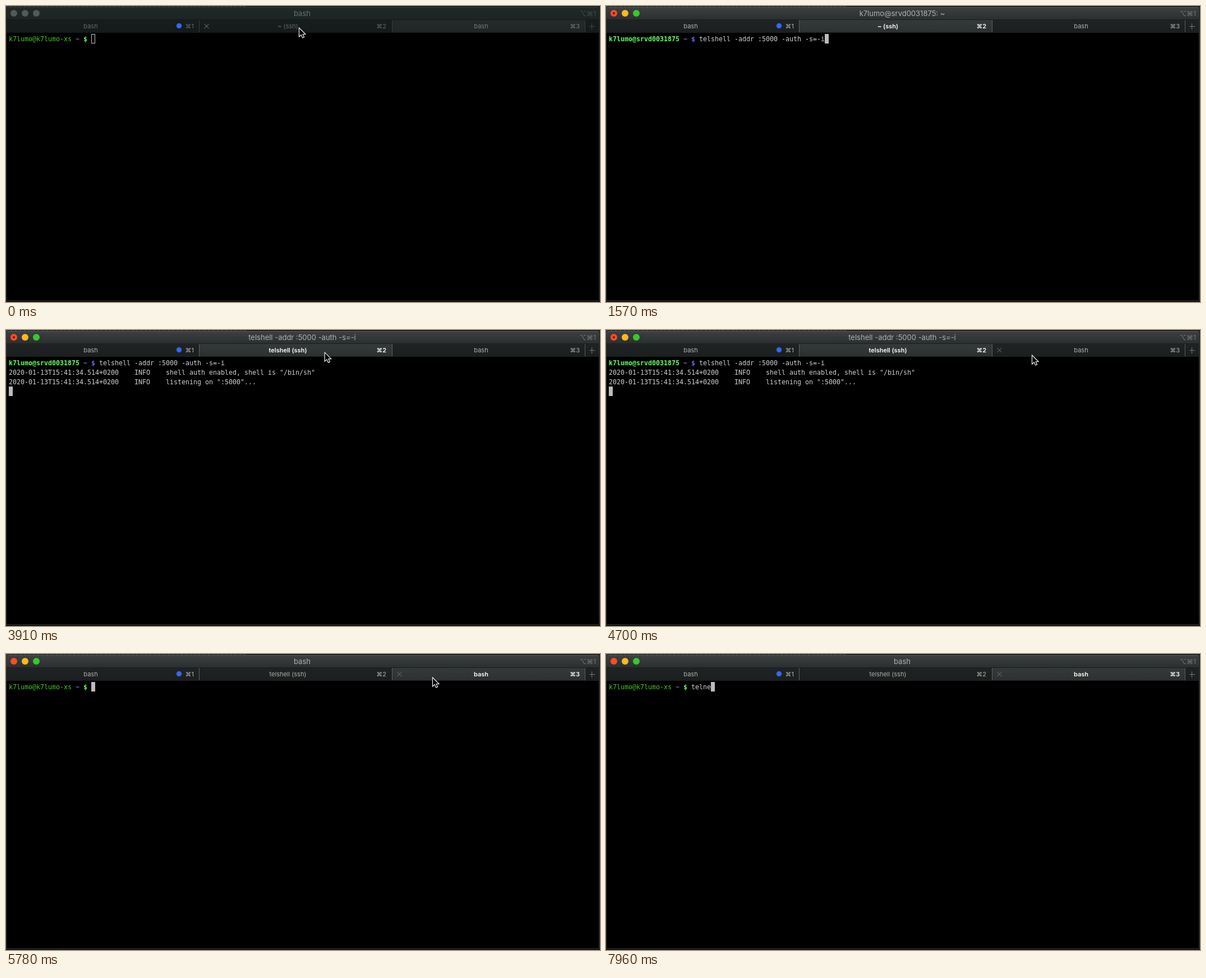
These frames come from a looping animation (1059x529 px, 8 s). An HTML page with a canvas:

```html
<!DOCTYPE html>
<html lang="en">
<head>
<meta charset="utf-8">
<title>Terminal session</title>
<style>
  html, body { margin: 0; width: 100%; height: 100%; overflow: hidden; background: #000; }
  canvas { display: block; }
</style>
</head>
<body>
<canvas id="stage" width="1059" height="529"></canvas>
<script>
const g = document.getElementById('stage').getContext('2d');
const LOOP = 8000, CELL = 7, ROW = 17;
const UI = 'Inter, "Noto Sans", "DejaVu Sans", sans-serif';
const MONO = '11.63px "DejaVu Sans Mono", monospace';
const USER = 'k7lumo', LOCAL = USER + '-xs', REMOTE = 'srvd0031875';
const COMMAND = 'telshell -addr :5000 -auth -s=-i';
const STAMP = '2020-01-13T15:41:34.514+0200';

// Times of the events, in ms
const FOCUS = 500, TO_REMOTE = 900, RECALL = 1250, RUN = 2100;
const SHOW_MOUSE = 3700, HOVER = 4150, TO_LOCAL = 5250, TYPE = 6640;
const KEYS = [[TYPE, 'e'], [7020, ''], [7240, 't'], [7400, 'te'],
              [7560, 'tel'], [7740, 'teln'], [7900, 'telne']];

// Window chrome with and without focus
const LIT = {
  title: ['#3c4040', '#2b2f2f'], tab: ['#202323', '#1c1f1f'], active: ['#343939', '#2d3131'],
  rim: '#5c6060', rule: '#1a1c1c', edge: '#323434',
  heading: '#b0b2b2', hint: '#747878', text: '#b0b2b2', strong: '#ffffff',
  lights: ['#ff4b28', '#ffb820', '#34c82c']
};
const DIM = {
  title: ['#202828', '#1c2424'], tab: ['#171d1d', '#151a1a'], active: ['#232a29', '#202625'],
  rim: '#343c3c', rule: '#121616', edge: '#262a2a',
  heading: '#6a7070', hint: '#444a4a', text: '#626868', strong: '#767c7c',
  lights: ['#535858', '#535858', '#535858']
};

function rect(x, y, w, h, fill) {
  g.fillStyle = fill;
  g.fillRect(x, y, w, h);
}

function shade(x, y, w, h, [top, bottom]) {
  const fill = g.createLinearGradient(0, y, 0, y + h);
  fill.addColorStop(0, top);
  fill.addColorStop(1, bottom);
  rect(x, y, w, h, fill);
}

function disc(x, y, r, fill) {
  g.fillStyle = fill;
  g.beginPath();
  g.arc(x, y, r, 0, 7);
  g.fill();
}

function line(x1, y1, x2, y2, color) {
  g.strokeStyle = color;
  g.lineWidth = 1;
  g.beginPath();
  g.moveTo(x1, y1);
  g.lineTo(x2, y2);
  g.stroke();
}

function label(text, x, y, color, size = 11, weight = 400, align = 'center') {
  g.font = `${weight} ${size}px ${UI}`;
  g.textAlign = align;
  g.fillStyle = color;
  g.fillText(text, x, y);
}

// Draws [text, colour, bold] runs on one terminal row; returns the end column
function runs(row, parts) {
  let col = 0;
  g.textAlign = 'left';
  for (const [text, color, bold] of parts) {
    g.font = (bold ? 'bold ' : '') + MONO;
    g.fillStyle = color;
    g.fillText(text, 5 + col * CELL, 63 + row * ROW);
    col += text.length;
  }
  return col;
}

function caret(col, row, hollow) {
  const x = 5 + col * CELL, y = 50 + row * ROW;
  if (hollow) {
    g.strokeStyle = '#c0c0c0';
    g.lineWidth = 1;
    g.strokeRect(x + .5, y + .5, 6, 16);
  } else rect(x, y, CELL, ROW, '#bcbcbc');
}

function cross(x, color) {
  line(x - 4, 32, x + 4, 40, color);
  line(x + 4, 32, x - 4, 40, color);
}

function titleBar(skin, remote, running) {
  shade(1, 2, 1056, 22, skin.title);
  rect(3, 2, 1052, 1, skin.rim);
  skin.lights.forEach((c, i) => disc(14 + i * 20, 13, 6, c));
  if (remote) disc(14, 13, 2, '#7a1000');
  const title = !remote ? 'bash' : running ? COMMAND : `${USER}@${REMOTE}: ~`;
  label(title, 528, 18, skin.heading, 13);
  label('⌥⌘1', 1052, 18, skin.hint, 12, 400, 'right');
}

function tabBar(t, skin, remote, running) {
  const names = ['bash', running ? 'telshell (ssh)' : '~ (ssh)', 'bash'];
  const active = remote ? 1 : 2;
  rect(1, 24, 1056, 24, skin.rule);
  names.forEach((name, i) => {
    const on = i === active, x = 1 + i * 344;
    const color = on ? skin.strong : skin.text;
    const weight = on && skin === LIT ? 600 : 400;
    shade(x, 25, 343, 22, on ? skin.active : skin.tab);
    rect(x + 343, 25, 1, 22, skin.rim);
    label(name, [151, 502.5, 847][i], 40, color, 11, weight);
    label('⌘' + (i + 1), [335, 678, 1023][i], 40, color, 11, weight, 'right');
  });
  shade(1034, 25, 23, 22, skin.tab);
  disc(308.5, 35.5, 4.7, '#3068f0');
  line(1040, 36.5, 1050, 36.5, skin.hint);
  line(1044.5, 31, 1044.5, 42, skin.hint);
  if (t < TO_REMOTE) cross(357.5, '#808686');
  if (t >= HOVER) cross(701.5, '#707474');
}

function terminal(t, focused, remote, running) {
  if (!remote) {
    const typed = KEYS.reduce((now, [at, text]) => t >= at ? text : now, '');
    const col = runs(0, [[`${USER}@${LOCAL} `, '#40c81c'], ['~ ', '#6464e8', true],
                         ['$ ', '#5cff5c', true], [typed, '#d0d0d0']]);
    caret(col, 0, !focused);
    return;
  }
  const col = runs(0, [[`${USER}@${REMOTE} `, '#5cff5c', true], ['~ $ ', '#6868f4', true],
                       [t >= RECALL ? COMMAND : '', '#d0d0d0']]);
  if (!running) return caret(col, 0);
  ['shell auth enabled, shell is "/bin/sh"', 'listening on ":5000"...'].forEach((text, i) =>
    runs(i + 1, [[`${STAMP}    INFO    ${text}`, '#d0d0d0']]));
  caret(0, 3);
}

function pointer(t) {
  if (t >= RECALL && t < SHOW_MOUSE || t >= TYPE) return;
  let x = 522.5, y = 39;
  if (t >= SHOW_MOUSE) {
    const p = Math.min(1, (t - SHOW_MOUSE) / 750), e = p * p * (3 - 2 * p);
    const q = Math.max(0, Math.min(1, (t - 4850) / 250));
    x += 237 * e + q;
    y += 6 * e - 3 * q;
  }
  g.save();
  g.translate(x, y);
  g.beginPath();
  [[0, 0], [0, 16], [3.7, 12.5], [6.2, 18], [9, 16.8], [6.7, 11.5], [11.5, 11.5]]
    .forEach(([a, b]) => g.lineTo(a, b));
  g.closePath();
  g.fillStyle = '#000';
  g.fill();
  g.strokeStyle = '#f0f0f0';
  g.lineWidth = 1.2;
  g.stroke();
  g.restore();
}

function edges(skin) {
  rect(0, 0, 1059, 2, '#1c2020');
  g.setLineDash([3, 2, 1, 2]);
  line(0, .5, 428, .5, '#5c6060');
  g.setLineDash([]);
  rect(0, 2, 1, 525, skin.edge);
  rect(1057, 2, 1, 525, skin.edge);
  rect(1058, 2, 1, 527, '#1e2020');
  rect(0, 526, 1058, 1, skin.edge);
  rect(0, 527, 1059, 2, '#101212');
}

function draw(t) {
  const focused = t >= FOCUS;
  const remote = t >= TO_REMOTE && t < TO_LOCAL;
  const running = t >= RUN;
  const skin = focused ? LIT : DIM;
  rect(0, 0, 1059, 529, '#000');
  edges(skin);
  titleBar(skin, remote, running);
  tabBar(t, skin, remote, running);
  terminal(t, focused, remote, running);
  pointer(t);
}

const start = performance.now();
function tick() {
  draw((performance.now() - start) % LOOP);
  requestAnimationFrame(tick);
}
tick();
</script>
</body>
</html>
```
